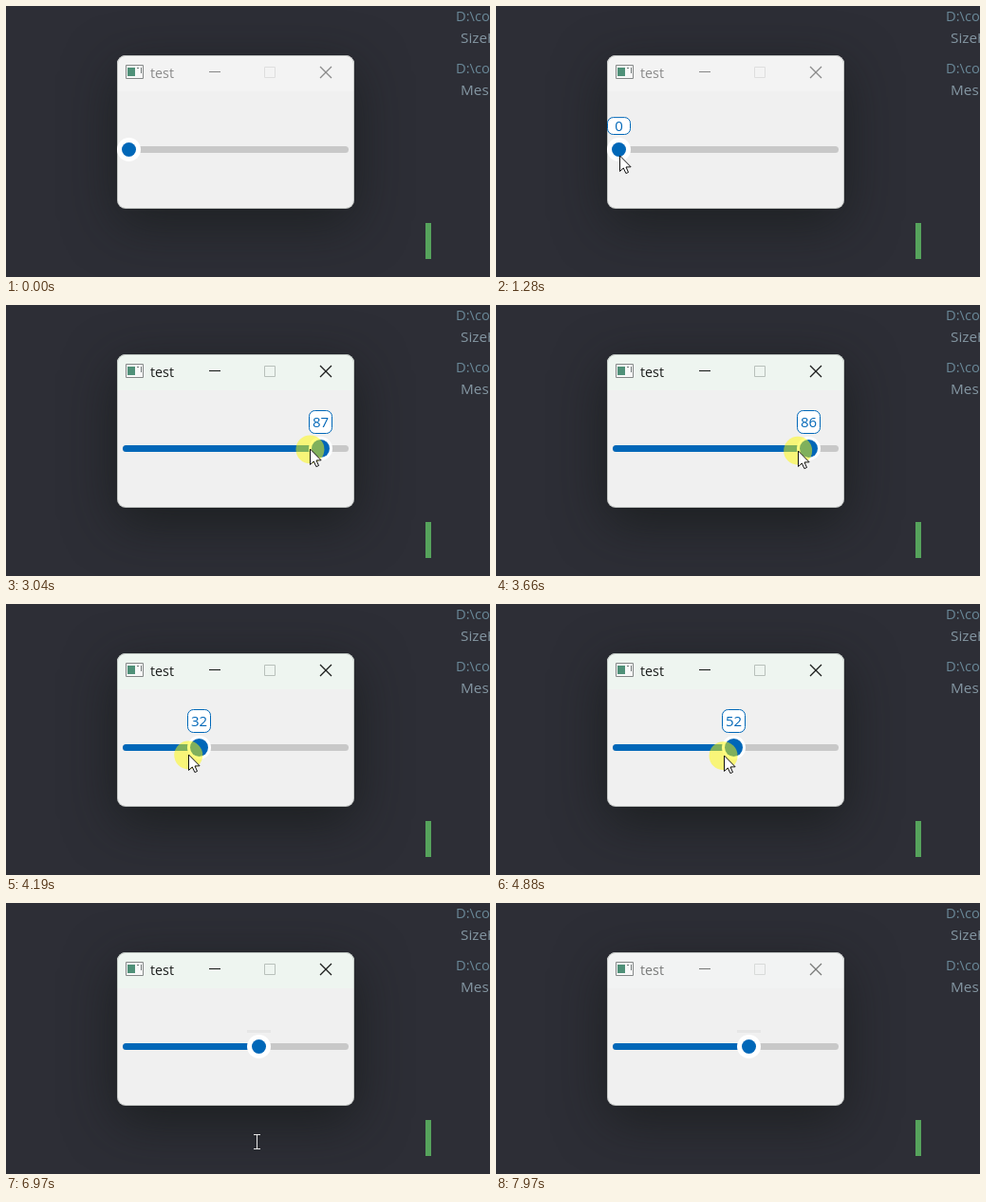
Recreate the animation shown at these times as an HTML page with a canvas. Size 510 px wide and 286 px high, loop 8.02 s.

```html
<!DOCTYPE html>
<html lang="en">
<head>
<meta charset="utf-8">
<title>Slider</title>
<style>
html, body { margin: 0; width: 100%; height: 100%; overflow: hidden; background: #2d2e36; }
canvas { display: block; }
</style>
</head>
<body>
<canvas id="stage" width="510" height="286"></canvas>
<script>
const ctx = document.getElementById('stage').getContext('2d');
const LOOP = 8020, SHOW = 650, PRESS = 1940, RELEASE = 5350, HIDE = 7720;
const BLUE = '#0067b8', FONT = '"Open Sans", "Noto Sans", sans-serif';
const MIN_X = 129.5, MAX_X = 347.5, STEP = 2.327, GRAB = 11.2;

const smooth = k => k * k * (3 - 2 * k);
const easeOut = k => 1 - (1 - k) ** 4;
const clamp = (v, a = 0, b = 1) => Math.min(b, Math.max(a, v));
const ramp = (t, a, b) => clamp((t - a) / (b - a));
const mix = (a, b, k) => `rgb(${a.map((v, i) => Math.round(v + (b[i] - v) * k))})`;

// The pointer rests between these moves
const moves = [
  { from: SHOW, to: 1430, x: 141, y: 152, ease: smooth },
  { from: 2330, to: 3240, x: 345.5, y: 152.5, ease: smooth },
  { from: 3400, to: 4480, x: 159.4, y: 161, ease: smooth },
  { from: 4610, to: RELEASE, x: 255, y: 160, ease: easeOut },
  { from: 5450, to: 6020, x: 263.5, y: 252, ease: smooth },
  { from: 7070, to: HIDE, x: 376, y: 300, ease: smooth }
];

function pointerAt(t) {
  let x = 27, y = 211;
  for (const m of moves) {
    const k = m.ease(ramp(t, m.from, m.to));
    x += (m.x - x) * k;
    y += (m.y - y) * k;
  }
  return [x, y];
}

function box(x, y, w, h, r, fill, stroke) {
  ctx.beginPath();
  ctx.roundRect(x, y, w, h, r);
  if (fill) {
    ctx.fillStyle = fill;
    ctx.fill();
  }
  if (stroke) {
    ctx.strokeStyle = stroke;
    ctx.lineWidth = 1;
    ctx.stroke();
  }
}

function disc(x, y, r, color) {
  ctx.fillStyle = color;
  ctx.beginPath();
  ctx.arc(x, y, r, 0, 7);
  ctx.fill();
}

function line(x1, y1, x2, y2, color, width = 1) {
  ctx.strokeStyle = color;
  ctx.lineWidth = width;
  ctx.beginPath();
  ctx.moveTo(x1, y1);
  ctx.lineTo(x2, y2);
  ctx.stroke();
}

function text(s, x, y, size, color, align = 'left') {
  ctx.font = `${size}px ${FONT}`;
  ctx.textAlign = align;
  ctx.fillStyle = color;
  ctx.fillText(s, x, y);
}

function backdrop() {
  box(0, 0, 510, 286, 0, '#2d2e36');
  ['SizeH', 'Mes'].forEach((word, i) => {
    text('D:\\coo', 474, 16 + 55 * i, 14.7, '#6a8898');
    text(word, 479, 39 + 55 * i, 15.3, '#8496a2');
  });
  box(442, 229, 6, 38, 0, '#56a35c');
}

function frame(active) {
  ctx.save();
  ctx.shadowColor = `rgba(22,26,24,${0.66 + 0.08 * active})`;
  ctx.shadowBlur = 54;
  ctx.shadowOffsetY = 15;
  box(117, 52, 250, 162, 9, '#f0f0f0');
  ctx.restore();
  box(117, 52, 250, 38, [9, 9, 0, 0], mix([243, 243, 243], [238, 245, 240], active));
  box(117.5, 52.5, 249, 161, 8.5, null, 'rgba(90,100,95,.3)');

  const ink = mix([138, 138, 138], [26, 28, 27], active);
  const faint = mix([222, 222, 222], [184, 192, 187], active);
  // Window icon
  box(126.5, 62.5, 18, 14, 0, '#f8f8f8', '#858888');
  box(128, 65, 8, 9, 0, '#4f9078');
  box(138, 65, 2, 1, 0, '#6f7777');
  box(142, 65, 1, 6, 0, '#6f7777');

  text('test', 152, 76, 14.3, ink);
  line(214, 69.5, 226, 69.5, ink, 1.1);
  box(272.5, 64.5, 11, 11, 0, null, faint);
  line(331, 64, 343, 76, ink, 1.2);
  line(343, 64, 331, 76, ink, 1.2);
}

function tooltip(x, value, open) {
  const h = 25 * open, top = 136 - h;
  if (h < 2) return line(x - 12.5, 135.5, x + 12.5, 135.5, '#5a5a5a');
  ctx.save();
  box(x - 12, top + 0.5, 24, h - 1, Math.min(6, (h - 1) / 2), '#fff', BLUE);
  ctx.clip();
  text(value, x, top + h / 2 + 5.7, 15, BLUE, 'center');
  ctx.restore();
}

function slider(t) {
  const grabbed = Math.floor(pointerAt(Math.min(t, RELEASE))[0] + GRAB) + 0.5;
  const raw = t < PRESS ? MIN_X : grabbed;
  const x = Math.min(raw, MAX_X);
  const value = Math.round((raw - MIN_X) / STEP);
  const hover = ramp(t, 1340, 1480) - ramp(t, 5650, 5800);

  box(123, 148, 238, 7, 3.5, '#c8c8c8');
  if (value) box(123, 148, x - 123, 7, 3.5, BLUE);
  disc(x, 151.5, 12.5, '#fff');
  disc(x, 151.5, 7.5 + 2 * hover, BLUE);

  if (t >= 6020) box(x - 12.5, 134, 25, 3, 0, '#e6e6e6');
  else if (t >= 1130) tooltip(x, value, ramp(t, 1130, 1330) - ramp(t, 5740, 5960));
}

function arrow(x, y) {
  const shape = [[0, 0], [0, 16.5], [3.8, 13], [6.4, 18.6], [9, 17.5], [6.5, 12], [11.6, 11.8]];
  ctx.beginPath();
  for (const [dx, dy] of shape) ctx.lineTo(x + 0.5 + dx, y + dy);
  ctx.closePath();
  ctx.fillStyle = '#fff';
  ctx.fill();
  ctx.strokeStyle = '#111';
  ctx.lineWidth = 1;
  ctx.stroke();
}

function beam(x, y) {
  for (const dy of [-7.5, 7.5]) line(x - 3, y + dy, x + 4, y + dy, '#e8e8e8');
  line(x + 0.5, y - 7, x + 0.5, y + 7, '#e8e8e8');
}

function draw(t) {
  const [x, y] = pointerAt(t);
  backdrop();
  frame(ramp(t, PRESS, 2090) - 0.85 * ramp(t, 7770, 7970));
  slider(t);
  if (t >= PRESS && t < RELEASE) disc(x, y, 15, 'rgba(255,250,0,.5)');
  if (t >= SHOW && t < HIDE) {
    const cursor = x < 117 || y > 214 ? beam : arrow;
    cursor(Math.round(x), Math.round(y));
  }
}

const start = performance.now();
function tick() {
  draw((performance.now() - start) % LOOP);
  requestAnimationFrame(tick);
}
tick();
</script>
</body>
</html>
```
